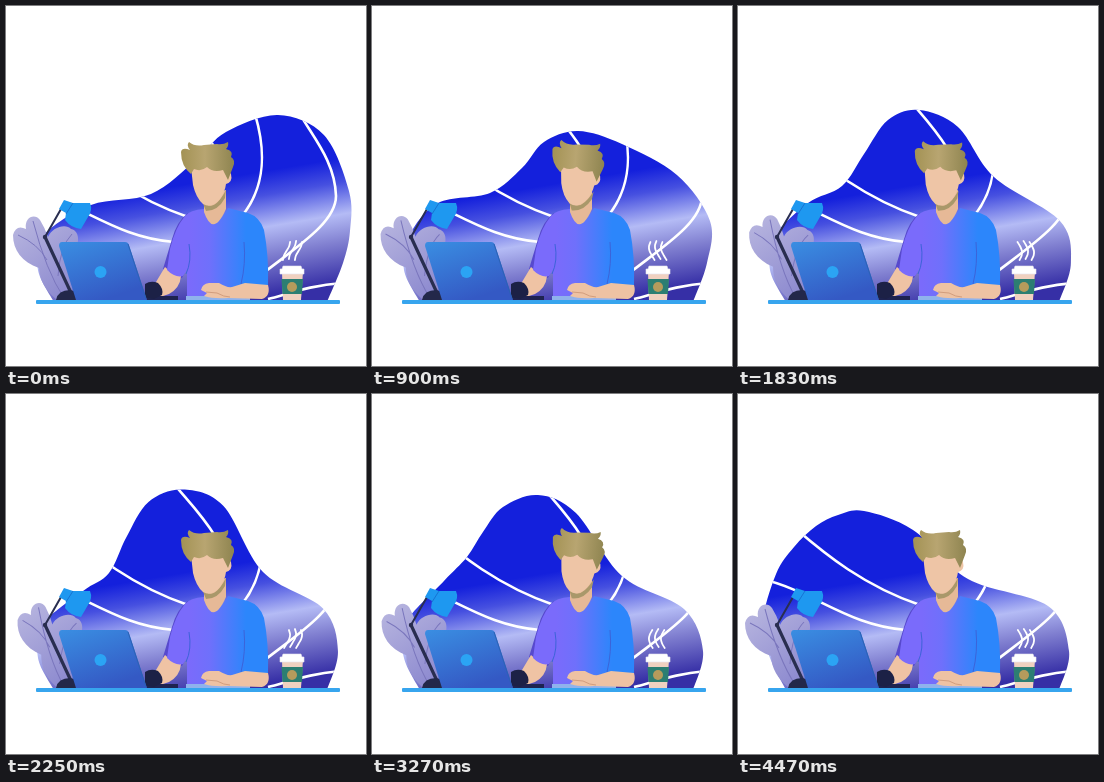
These frames come from a looping animation (360 by 360 pixels, 4500 ms). An HTML page:

```html
<!DOCTYPE html>
<html lang="en">
<head>
<meta charset="utf-8">
<title>Working at a desk</title>
<style>
html, body { margin: 0; width: 100%; height: 100%; overflow: hidden; background: #fff; }
svg { display: block; width: 100vw; height: 100vh; }
</style>
</head>
<body>
<svg viewBox="0 0 360 360">
  <defs>
    <clipPath id="clip"><path id="blob"/></clipPath>
    <linearGradient id="sky" gradientUnits="userSpaceOnUse" x1="163" y1="105" x2="196" y2="300">
      <stop offset=".38" stop-color="#1420dc"/>
      <stop offset=".5" stop-color="#4650e0"/>
      <stop offset=".66" stop-color="#b4bbf5"/>
      <stop offset=".8" stop-color="#807fd0"/>
      <stop offset="1" stop-color="#362fa6"/>
    </linearGradient>
    <linearGradient id="shirt" gradientUnits="userSpaceOnUse" x1="184" y1="0" x2="240" y2="0">
      <stop offset="0" stop-color="#7a6bfb"/>
      <stop offset=".35" stop-color="#6f70fb"/>
      <stop offset="1" stop-color="#2c86fb"/>
    </linearGradient>
    <linearGradient id="lid" x2=".5" y2="1">
      <stop offset="0" stop-color="#3a8ee2"/>
      <stop offset="1" stop-color="#3459c4"/>
    </linearGradient>
    <linearGradient id="hair">
      <stop offset="0" stop-color="#a39254"/>
      <stop offset=".45" stop-color="#b8a571"/>
      <stop offset="1" stop-color="#8e8450"/>
    </linearGradient>
    <linearGradient id="leaf" x2=".6" y2="1">
      <stop offset="0" stop-color="#bab8e0"/>
      <stop offset="1" stop-color="#8f8cd0"/>
    </linearGradient>
  </defs>

  <g clip-path="url(#clip)">
    <rect y="80" width="360" height="215" fill="url(#sky)"/>
    <g fill="none" stroke="#fff" stroke-width="2.6">
      <path d="M249 108C260 145 260 180 236 210"/>
      <path d="M294 108C306 130 329 155 330 190C330 216 292 240 260 265"/>
      <path d="M164 85C178 103 195 119 209 142"/>
      <path d="M58 135C87 160 126 192 182 211"/>
      <path d="M24 185C75 197 110 232 168 236"/>
      <path d="M262 293C282 288 305 279 336 277"/>
    </g>
  </g>

  <g id="plant">
    <path fill="url(#leaf)" d="M50 293Q34 280 33 262C16 256 7 244 7 229Q10 218 20 223C18 211 29 207 34 214Q39 222 42 231C46 221 60 217 65 223C75 225 74 241 65 248Q70 270 63 293Z"/>
    <path fill="none" stroke="#7a76bd" d="M27 215Q40 265 58 292M12 229Q32 238 41 254M66 228Q54 240 52 270"/>
  </g>

  <g fill="none" stroke="#292e50" stroke-linecap="round">
    <path stroke-width="2" d="M55 203L39 231"/>
    <path stroke-width="3.2" d="M39 231L66 289"/>
  </g>
  <circle cx="39" cy="231" r="2.2" fill="#292e50"/>
  <path fill="#23284a" d="M50 294Q52 284 64 284Q73 285 73 294Z"/>
  <path fill="#1e98f0" d="M53 203L58 194L67 197H84Q87 204 82 211L75 223Q65 222 59 214L60 207Z"/>
  <path fill="none" stroke="#1773d3" d="M67 197L60 208"/>

  <path fill="#5749cd" d="M182 207Q171 215 166 233L157 263Q166 272 176 272L190 245Z"/>
  <path fill="#efc3a4" d="M159 261Q167 269 175 270Q174 282 163 288L151 292L147 281Z"/>
  <path fill="url(#shirt)" d="M198 203Q184 204 179 210Q169 222 164 243L161 264Q169 272 177 270L181 264V293H238V279L262 280Q263 250 258 224Q254 211 242 207L222 202Q210 226 198 203Z"/>
  <path fill="none" stroke="#3c63d9" d="M183 238Q186 255 180 268M238 236Q240 258 235 278"/>
  <path fill="#e6b997" d="M198 190L220 184V203Q207 232 198 206Z"/>

  <g id="head">
    <path fill="#a9986a" d="M194 190Q205 212 220 184L219 192Q212 205 200 205Z"/>
    <path fill="#eec5a6" d="M185 161L187 179Q190 192 197 198Q206 203 214 193Q219 186 220 178Q227 176 225 168L218 158Z"/>
    <path fill="url(#hair)" d="M185 168Q175 160 175 146Q176 141 184 144Q180 139 183 136Q189 141 198 139L211 138Q217 139 222 136Q223 140 220 143Q228 145 225 151Q230 154 227 161L222 174L217 164Q207 167 201 161Q195 166 188 163Z"/>
  </g>

  <path fill="#8fb2ec" d="M180 290H244V294H180Z"/>
  <path fill="#eec2a3" d="M262 279Q265 290 256 293L222 292Q207 293 198 290L201 287L195 284Q196 278 203 277H213Q221 282 226 281L239 277Z"/>
  <path fill="none" stroke="#d29d7d" d="M200 286L211 287Q218 291 224 291"/>

  <path fill="#1e2350" d="M138 290H172V294H138Z"/>
  <path fill="#1c2146" d="M139 278Q145 274 152 277Q158 283 156 289L148 293L139 291Z"/>
  <path fill="url(#lid)" d="M56 236H119Q122 236 123 239L141 294H70L53 240Q53 236 56 236Z"/>
  <path fill="none" stroke="#2b62b5" d="M122 238L140 293"/>
  <circle cx="94.5" cy="266" r="6" fill="#2ba4f4"/>

  <path fill="#f0d1c0" d="M276 266H297L295 294H277Z"/>
  <path fill="#2c7e72" d="M275.5 273H297L296 288H276.5Z"/>
  <circle cx="286" cy="281" r="5" fill="#b59b5c"/>
  <path fill="#fff" stroke="#e5e3ee" stroke-width=".6" d="M277 260H295L296 263H298V268H274V263H276Z"/>
  <path id="steam" fill="none" stroke="#fff" stroke-width="1.8" stroke-linecap="round"/>

  <rect x="30" y="294" width="304" height="4" rx="1" fill="#37a5ee"/>
</svg>
<script>
const LOOP = 4500, TURN = 2670;
const byId = id => document.getElementById(id);

// Upper edge of the blob: eight points, left to right, at each key time.
const rise = { at: 0, pts: [85,199, 145,188, 190,154, 220,126, 272,109, 318,129, 343,185, 344,225] };
const sink = { at: 900, pts: [66,197, 118,187, 150,162, 172,136, 206,125, 250,138, 305,169, 338,215] };
const swell = { at: 1830, pts: [70,197, 104,180, 126,148, 150,114, 181,104, 220,121, 256,171, 322,215] };
const crest = { at: TURN, pts: [84,197, 102,178, 115,138, 135,102, 172,87, 214,102, 258,185, 312,214] };
const lean = { at: 3270, pts: [72,187, 95,163, 111,138, 131,113, 166,101, 204,119, 250,182, 312,215] };
const rest = { at: LOOP, pts: [38,180, 56,153, 78,132, 100,121, 126,117, 175,136, 230,185, 310,212] };
const keys = [rise, sink, swell, crest, lean, rest];

function edge(t) {
  const i = keys.findIndex(k => t < k.at);
  const a = keys[i - 1], b = keys[i];
  let k = (t - a.at) / (b.at - a.at);
  if (b === rest) k = 1 - (1 - k) ** 1.9;
  const v = a.pts.map((p, n) => p + (b.pts[n] - p) * k);
  const mid = [];
  for (let n = 0; n < v.length; n += 2) mid.push([v[n], v[n + 1]]);
  const left = 37 - 13 * Math.max(0, (t - TURN) / (LOOP - TURN));
  const right = 337 - 6 * Math.min(1, t / TURN);
  return [[48, 296], [32, 264], [left, 230], ...mid, [right, 257], [321, 296]];
}

function smooth(p) {
  const at = i => p[Math.max(0, Math.min(p.length - 1, i))];
  let d = "M" + p[0];
  for (let i = 0; i < p.length - 1; i++) {
    const [a, b, c, e] = [at(i - 1), at(i), at(i + 1), at(i + 2)];
    const c1 = b.map((v, n) => v + (c[n] - a[n]) / 6);
    const c2 = c.map((v, n) => v - (e[n] - b[n]) / 6);
    d += `C${c1} ${c2} ${c}`;
  }
  return d;
}

function steam(t) {
  const phase = -Math.PI / 2 - t / 2600 * 2 * Math.PI;
  let d = "";
  for (let n = 0; n < 3; n++) {
    const pts = [];
    for (let u = 0; u <= 1; u += 0.25)
      pts.push([280.5 + n * 6 + 3.6 * Math.sin(phase + Math.PI * u), 254 - n % 2 - 18 * u]);
    d += smooth(pts);
  }
  return d;
}

const sway = (t, period) => (1 - Math.cos(t / period * 2 * Math.PI)) / 2;

function draw(t) {
  byId("blob").setAttribute("d", smooth(edge(t)) + "Z");
  byId("steam").setAttribute("d", steam(t));
  byId("head").setAttribute("transform", `rotate(${6 * sway(t, 2250)} 206 202)`);
  byId("plant").setAttribute("transform", `rotate(${4 * sway(t, LOOP)} 52 293)`);
}

const start = performance.now();
function tick() {
  draw(Math.max(0, performance.now() - start) % LOOP);
  requestAnimationFrame(tick);
}
tick();
</script>
</body>
</html>
```
